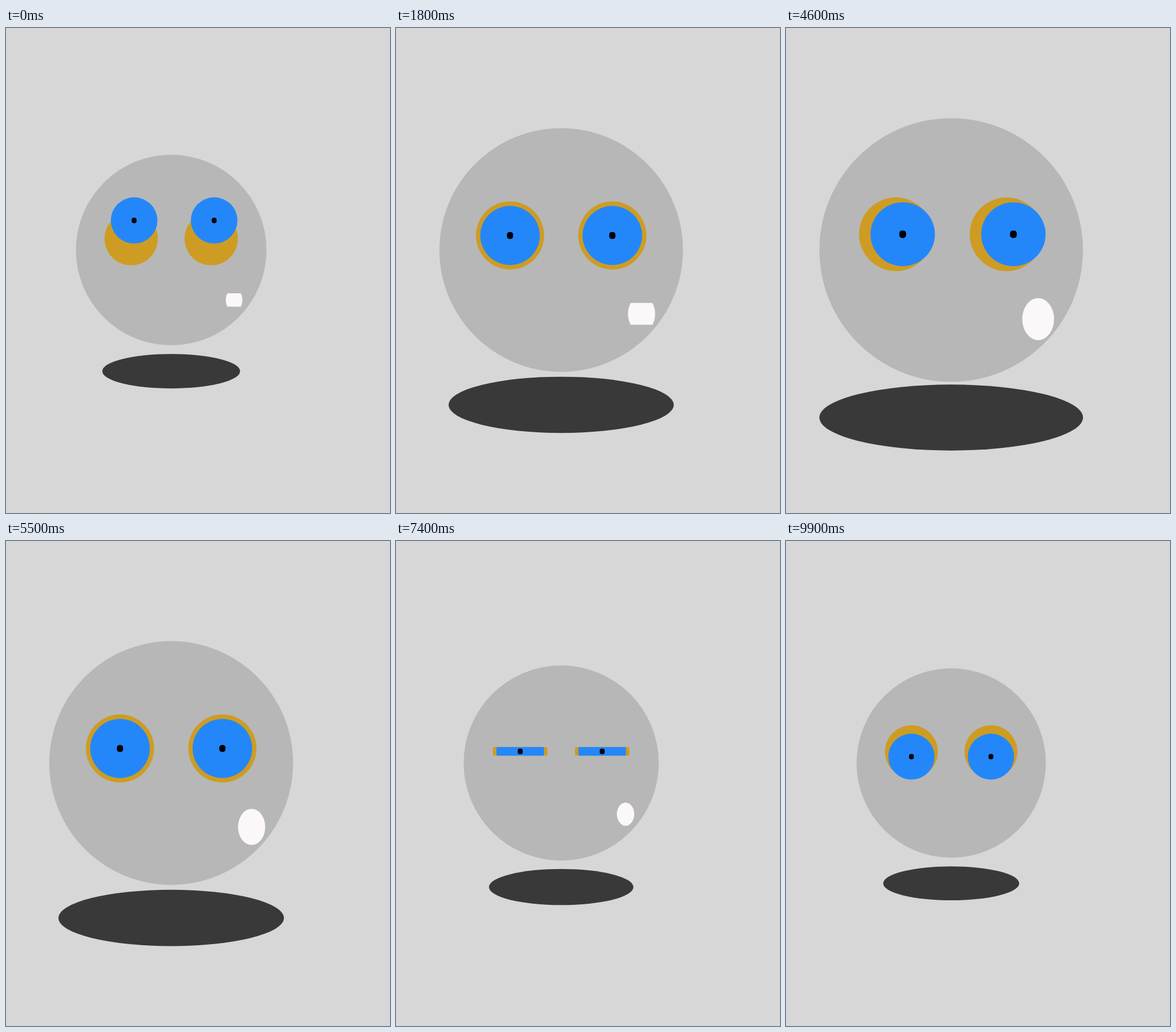
Write an HTML page with a canvas that moves like this. It is 666 px wide and 841 px high and loops after 10000 ms.

```html
<!DOCTYPE html>
<html lang="en">
<head>
<meta charset="utf-8">
<title>Floating face</title>
<style>
  html, body { margin: 0; width: 100%; height: 100%; overflow: hidden; background: #d7d7d7; }
  canvas { display: block; }
</style>
</head>
<body>
<canvas id="stage" width="666" height="841"></canvas>
<script>
const ctx = document.getElementById('stage').getContext('2d');
const W = 666, H = 841, LOOP = 10000, STEP = 100;
const CX = 286.5, CY = 385, BASE = 326.5, GROW = 0.4;

// Moments when the irises wander; offsets in face diameters
const GLANCES = [
  { at: 0, x: 0.0155, y: -0.0955 },
  { at: 3100, x: 0, y: 0.0145 },
  { at: 4600, x: 0.026, y: 0 },
  { at: 6300, x: 0, y: -0.2587 },
  { at: 9900, x: 0, y: 0.026 }
];
const EYE_BLINKS = [3109, 7426];

const clamp = k => Math.min(1, Math.max(0, k));
const smooth = k => k * k * (3 - 2 * k);

// Distance between two times on the loop
function apart(a, b, period = LOOP) {
  const d = Math.abs(a - b) % period;
  return Math.min(d, period - d);
}

// cubic-bezier(.25, .1, .25, 1)
function ease(x) {
  let lo = 0, hi = 1;
  for (let i = 0; i < 30; i++) {
    const m = (lo + hi) / 2;
    if (0.75 * m * (1 - m) + m ** 3 < x) lo = m; else hi = m;
  }
  const n = 1 - lo;
  return 0.3 * lo * n * n + 3 * lo * lo * n + lo ** 3;
}

// Swell, short rest, shrink, rest
function faceSize(t) {
  const p = (t + 220) % LOOP;
  const k = ease(clamp(p / 4600)) - ease(clamp((p - 4940) / 4200));
  return BASE * (1 + GROW * k);
}

function gaze(t) {
  const near = GLANCES.reduce((a, b) => apart(t, b.at) < apart(t, a.at) ? b : a);
  const k = smooth(clamp(1 - apart(t, near.at) / 500));
  return { x: near.x * k, y: near.y * k };
}

const openness = (t, blink, period) => clamp(apart(t, blink, period) / 165);

function oval(x, y, w, h, color) {
  ctx.fillStyle = color;
  ctx.beginPath();
  ctx.ellipse(x, y, w / 2, h / 2, 0, 0, Math.PI * 2);
  ctx.fill();
}

// Draw inside a horizontal band that closes towards y
function lids(y, h, open, paint) {
  ctx.save();
  if (open < 1) {
    ctx.beginPath();
    ctx.rect(0, y - h * open / 2, W, h * open);
    ctx.clip();
  }
  paint();
  ctx.restore();
}

function eye(x, y, d, look, open) {
  const ix = x + look.x * d, iy = y + look.y * d;
  const w = 0.0255 * d, h = 0.0285 * d;
  lids(y, 0.28 * d, open, () => {
    oval(x, y, 0.2795 * d, 0.2795 * d, '#ce9c23');
    oval(ix, iy, 0.2445 * d, 0.2425 * d, '#2487f9');
    ctx.fillStyle = '#000';
    ctx.beginPath();
    ctx.roundRect(ix - w / 2, iy - h / 2, w, h, w * 0.42);
    ctx.fill();
  });
}

function draw(t) {
  const d = faceSize(t), dd = d * d;
  ctx.fillStyle = '#d7d7d7';
  ctx.fillRect(0, 0, W, H);

  // Shadow and mouth grow with the square of the face
  oval(CX, CY + 0.6355 * d, 0.002188 * dd, 0.000547 * dd, '#393939');
  oval(CX, CY, d, d, '#b7b7b7');

  const look = gaze(t);
  const open = Math.min(...EYE_BLINKS.map(b => openness(t, b)));
  for (const side of [-1, 1]) {
    eye(CX + side * 0.21 * d, CY - 0.0598 * d, d, look, open);
  }

  const my = CY + 0.262 * d, mh = 0.00035 * dd;
  lids(my, mh, openness(t, 1900, 2000), () =>
    oval(CX + 0.33 * d, my, 0.000264 * dd, mh, '#fcf7f8'));
}

const start = performance.now();
function tick() {
  const t = Math.max(0, performance.now() - start) % LOOP;
  draw(Math.floor(t / STEP) * STEP);
  requestAnimationFrame(tick);
}
tick();
</script>
</body>
</html>
```
